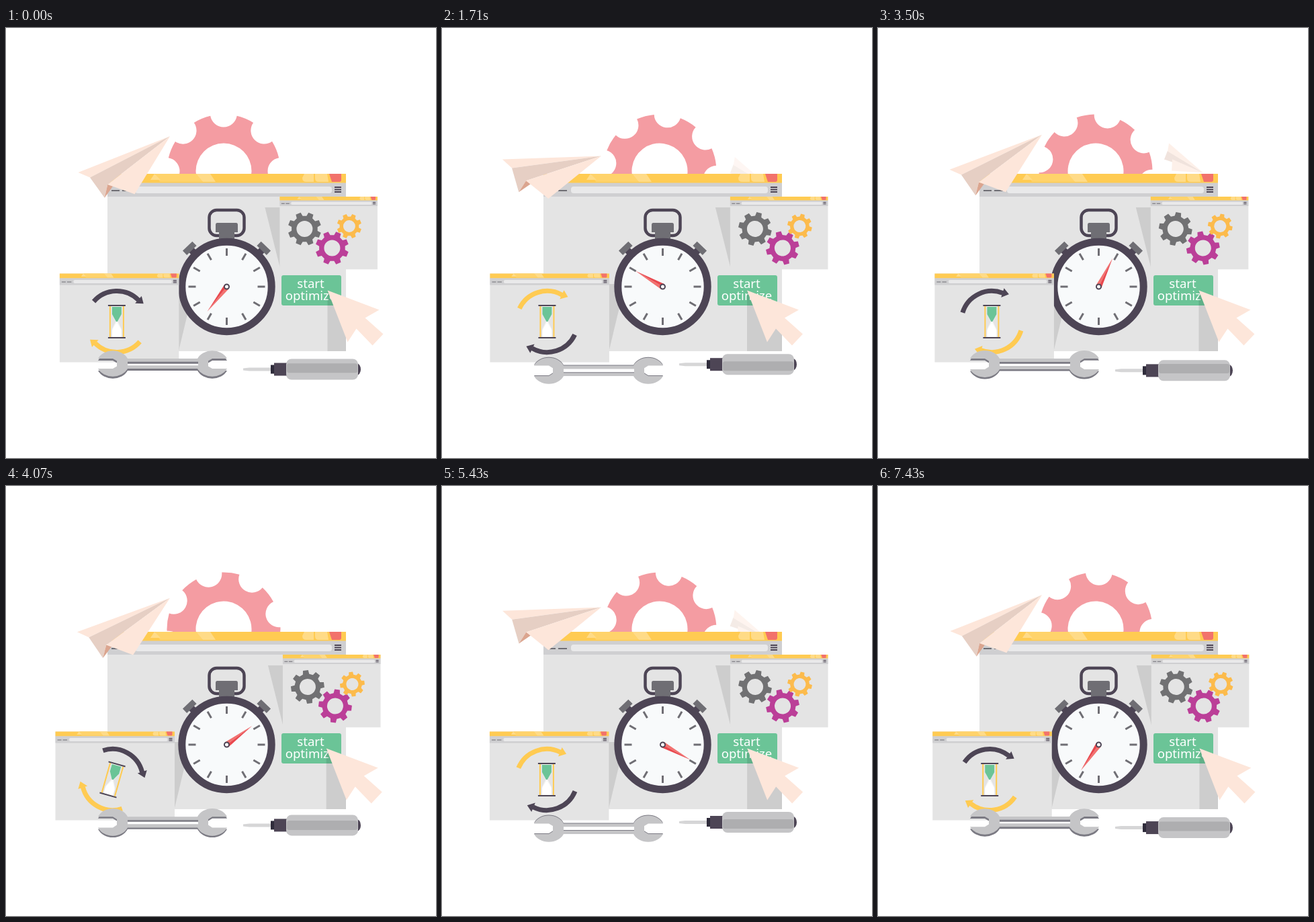
Recreate the animation shown at these times as an HTML page. Size 640 by 640 pixels, loop 7.5 s.

```html
<!DOCTYPE html>
<html lang="en">
<head>
<meta charset="utf-8">
<title>Optimize</title>
<style>
html, body { margin: 0; width: 100%; height: 100%; overflow: hidden; background: #fff; }
svg { display: block; width: 100vw; height: 100vh; }
text { font: 18.6px "Noto Sans", "Open Sans", sans-serif; fill: #fff; text-anchor: middle; }
.dark { fill: #4d4555; }
.grey { fill: #6f6e74; }
.peach { fill: #fde6da; }
.fold { fill: #e6cfc4; }
.clay { fill: #dba58f; }
.shade { fill: #000; opacity: .1; }
</style>
</head>
<body>
<svg viewBox="0 0 640 640">
  <defs>
    <clipPath id="page"><path d="M151 251H506V481H151Z"/></clipPath>
    <g id="window">
      <path fill="#e4e4e4" d="M0 0H355V264H0Z"/>
      <path fill="#cfcfd1" d="M0 13H355V34H0Z"/>
      <path fill="#ffcb52" d="M0 0H355V13.500H0Z"/>
      <path fill="#ffd36b" d="M64 9L72 0H132L142 12H78L75 6Z"/>
      <path fill="#ffdb87" d="M132 0H153L161 12H142ZM64 9L70 0L79 9ZM293 0H307V12H296Q290 12 290 6ZM309 0H327L329 12H314Q309 12 309 6Z"/>
      <path fill="#f2726b" d="M330 0H348V9Q348 12 345 12H334Z"/>
      <rect x="41" y="19" width="293" height="10" rx="4" fill="#e9e9ea"/>
      <path class="grey" d="M6 24H18V26H6ZM22 24H35V26H22Z"/>
      <path class="dark" d="M338 19H348V21H338ZM338 22.500H348V24.500H338ZM338 26H348V28H338Z"/>
    </g>
    <path id="wrenchShape" fill-rule="evenodd" d="M137 -9.500A24 24 0 0 1 181 -9.500H285A24 24 0 0 1 329 -9.500H307L301 -5V5L307 9.500H329A24 24 0 0 1 285 9.500H181A24 24 0 0 1 137 9.500H159L165 5V-5L159 -9.500ZM181 -3.500V3.500H286V-3.500Z"/>
  </defs>

  <path id="bigGear" fill="#f49ca2" fill-rule="evenodd"/>
  <g id="dart">
    <path class="clay" d="M-7 24L3 16L5 24Z"/>
    <path class="fold" d="M-2 11L51 44L-7 24Z"/>
    <path class="peach" d="M0 0L51 44L-2 12ZM51 44L5 24L4 41Z"/>
  </g>
  <use href="#window" x="151" y="217"/>
  <rect x="410" y="368" width="89" height="45" rx="3" fill="#6bc497"/>
  <text x="453.500" y="387">start</text>
  <text x="453.500" y="405">optimize</text>
  <g clip-path="url(#page)">
    <path id="rightShade" class="shade" d="M-22 267H1V359Z"/>
    <path id="leftShade" class="shade" d="M177 381H201L177 481Z"/>
    <path id="cursorShade" class="shade" d="M0 391L54 412V481H0Z"/>
  </g>

  <g transform="translate(328.500 385)">
    <rect x="-26" y="-114" width="52" height="38" rx="11" fill="none" stroke="#4d4555" stroke-width="4.500"/>
    <path class="grey" d="M-14 -95H14Q16.500 -95 16.500 -92V-81H-16.500V-92Q-16.500 -95 -14 -95ZM-11.500 -82H11.500V-70H-11.500Z"/>
    <g id="knobs"></g>
    <circle r="66.700" fill="#f8fafb" stroke="#4d4555" stroke-width="11"/>
    <g id="ticks" stroke="#6f6e74" stroke-width="3"></g>
    <g id="hand">
      <path fill="#f2716f" d="M-4.500 0L0 -47V0Z"/>
      <path fill="#e9484e" d="M4.500 0L0 -47V0Z"/>
    </g>
    <circle r="3.500" fill="#fff" stroke="#4d4555" stroke-width="2"/>
  </g>

  <g id="rightWin">
    <use href="#window" transform="translate(0 251) scale(.41)"/>
    <g transform="translate(37 299)"><path id="gearA" fill="#717173" fill-rule="evenodd"/></g>
    <g transform="translate(78 327.500)"><path id="gearB" fill="#bb3f98" fill-rule="evenodd"/></g>
    <g transform="translate(103.500 295)"><path id="gearC" fill="#fcbb4c" fill-rule="evenodd"/></g>
  </g>

  <g id="leftWin">
    <use href="#window" transform="translate(0 365.500) scale(.5)"/>
    <g transform="translate(85 437)">
      <g id="arrows"></g>
      <g id="glass">
        <path fill="#f6f6f4" d="M-7 -23H7V-11L1.500 0L7 11V23H-7V11L-1.500 0L-7 -11Z"/>
        <path fill="#6bc497" d="M-7 -22H7V-11L1 0H-1L-7 -11Z"/>
        <path fill="#fff" d="M0 1L7 13V22H-7V13Z"/>
        <path fill="#ffcb52" d="M-11 -23H-9V23H-11ZM9 -23H11V23H9Z"/>
        <path class="dark" d="M-13 -25H13V-23H-13ZM-13 23H13V25H-13Z"/>
      </g>
    </g>
  </g>

  <path id="cursor" class="peach" d="M0 0L77 29L56 41L83 65L67 82L43 57L30 77Z"/>

  <g id="plane">
    <path class="peach" d="M-73.500 2L73.500 -2L-59.500 15Z"/>
    <path class="fold" d="M-59.500 15L73.500 -2L-38.500 34L-49.500 51Z"/>
    <path class="clay" d="M-49.500 51L-38.500 34L-32 39Z"/>
    <path class="peach" d="M73.500 -2L-38.500 34L-5.500 61Z"/>
  </g>

  <use id="wrenchEdge" href="#wrenchShape" fill="#7b7a83"/>
  <use id="wrenchFace" href="#wrenchShape" fill="#c5c5c7"/>

  <g id="driver">
    <path fill="#d6d6d7" d="M353 -1.500L362 -2.500H395V2.500H362L353 1.500Z"/>
    <path fill="#2f2c3b" d="M394 -6.500H400V6.500H394Z"/>
    <path class="dark" d="M399 -9.500H419V9.500H399Z"/>
    <ellipse class="dark" cx="522" rx="6" ry="9"/>
    <rect x="417" y="-15.500" width="107" height="31" rx="8" fill="#c5c5c7"/>
    <rect id="band" x="418" y="-7" width="105" height="14" rx="3" fill="#aeaeb0"/>
  </g>
</svg>
<script>
const LOOP = 7500, TAU = Math.PI * 2;
const el = id => document.getElementById(id);
const place = (id, value) => el(id).setAttribute('transform', value);
const shift = (id, x, y = 0) => place(id, `translate(${x} ${y})`);
const rad = deg => deg * TAU / 360;

// Point at a clockwise angle from straight up.
const polar = (r, deg) => `${r * Math.sin(rad(deg))} ${-r * Math.cos(rad(deg))}`;
const ring = r => `M${-r} 0A${r} ${r} 0 1 0 ${r} 0A${r} ${r} 0 1 0 ${-r} 0Z`;

function notchedGear(R, hole, notch, half) {
  let d = 'M' + polar(R, -half);
  for (let a = 0; a < 360; a += 45)
    d += `A${notch} ${notch} 0 0 0 ${polar(R, a + half)}A${R} ${R} 0 0 1 ${polar(R, a + 45 - half)}`;
  return d + 'Z' + ring(hole);
}

function toothedGear(R, hole) {
  const points = [], root = R * .78;
  for (let a = 22.5; a < 360; a += 45)
    points.push(polar(root, a - 14), polar(R, a - 9), polar(R, a + 9), polar(root, a + 14));
  return 'M' + points.join('L') + 'Z' + ring(hole);
}

el('bigGear').setAttribute('d', notchedGear(84.5, 41.5, 20, 13.5));
el('gearA').setAttribute('d', toothedGear(25, 12));
el('gearB').setAttribute('d', toothedGear(25, 12));
el('gearC').setAttribute('d', toothedGear(18.5, 9));

for (let a = 0; a < 360; a += 30)
  el('ticks').innerHTML += `<path d="M0 -46V-57" transform="rotate(${a})"/>`;
for (const a of [-44, 44])
  el('knobs').innerHTML += `<g transform="rotate(${a})">
    <path class="dark" d="M-5 -78H5V-68H-5Z"/><path class="grey" d="M-10 -84H10V-75H-10Z"/></g>`;
[['#4d4555', 0], ['#ffcb52', 180]].forEach(([color, a]) => {
  el('arrows').innerHTML += `<g transform="rotate(${a})">
    <path d="M${polar(45.5, -51)}A45.5 45.5 0 0 1 ${polar(45.5, 43)}" fill="none" stroke="${color}" stroke-width="7"/>
    <path d="M${polar(38.5, 43)}L${polar(53, 42)}L${polar(48, 54)}Z" fill="${color}"/></g>`;
});

const smooth = (p, from, to) => {
  const k = Math.min(1, Math.max(0, (p - from) / (to - from)));
  return k * k * (3 - 2 * k);
};

function draw(t) {
  const turn = t / LOOP * 360;
  const swing = (deg = 0) => Math.cos(rad(turn * 2 + deg));
  const sway = swing();

  place('bigGear', `translate(324 213) rotate(${-turn})`);
  place('gearA', `rotate(${turn})`);
  place('gearB', `rotate(${-turn})`);
  place('gearC', `rotate(${turn})`);
  place('hand', `rotate(${218 + turn})`);
  place('arrows', `rotate(${turn * 2 + 2})`);

  const right = 417.5 - 11.8 * swing(31), left = 77.2 + 12 * swing(77), tip = 466 + 12.5 * sway;
  shift('rightWin', right);
  shift('rightShade', right);
  shift('leftWin', left);
  shift('leftShade', left);
  shift('cursor', tip, 390.5);
  shift('cursorShade', tip);

  const beat = t % (LOOP / 4), p = beat / (LOOP / 4);
  place('glass', `rotate(${180 * (smooth(p, .12, .4) + smooth(p, .58, .85))})`);

  const bob = Math.sin(rad(turn * 3));
  place('plane', `translate(${169.5 + 6.3 * sway} ${188 - 5.5 * bob}) rotate(${-10 - 10 * sway})`);

  // The small dart rises at the left, slows down and fades as it drops behind the window.
  const u = beat - 945;
  const rise = u < 0 ? .0025 * u * u : 0;
  shift('dart', 163 + .72 * u - .000475 * u * u, 97.5 + .000172 * (u - 25) ** 2 + rise);
  el('dart').setAttribute('opacity', smooth(beat, 825, 875) * (1 - smooth(beat, 1400, 1900)));

  const squash = 1 - .2 * sway * sway, mid = 505 - 5.5 * sway;
  const edge = 2 * sway + sway * sway;
  place('wrenchFace', `translate(0 ${mid}) scale(1 ${squash})`);
  place('wrenchEdge', `translate(0 ${mid + edge}) scale(1 ${squash})`);

  const roll = swing(60);
  shift('driver', 0, 505 + 6 * roll);
  shift('band', 0, -3.5 * roll);
}

const start = performance.now();
(function frame() {
  draw((performance.now() - start) % LOOP);
  requestAnimationFrame(frame);
})();
</script>
</body>
</html>
```
